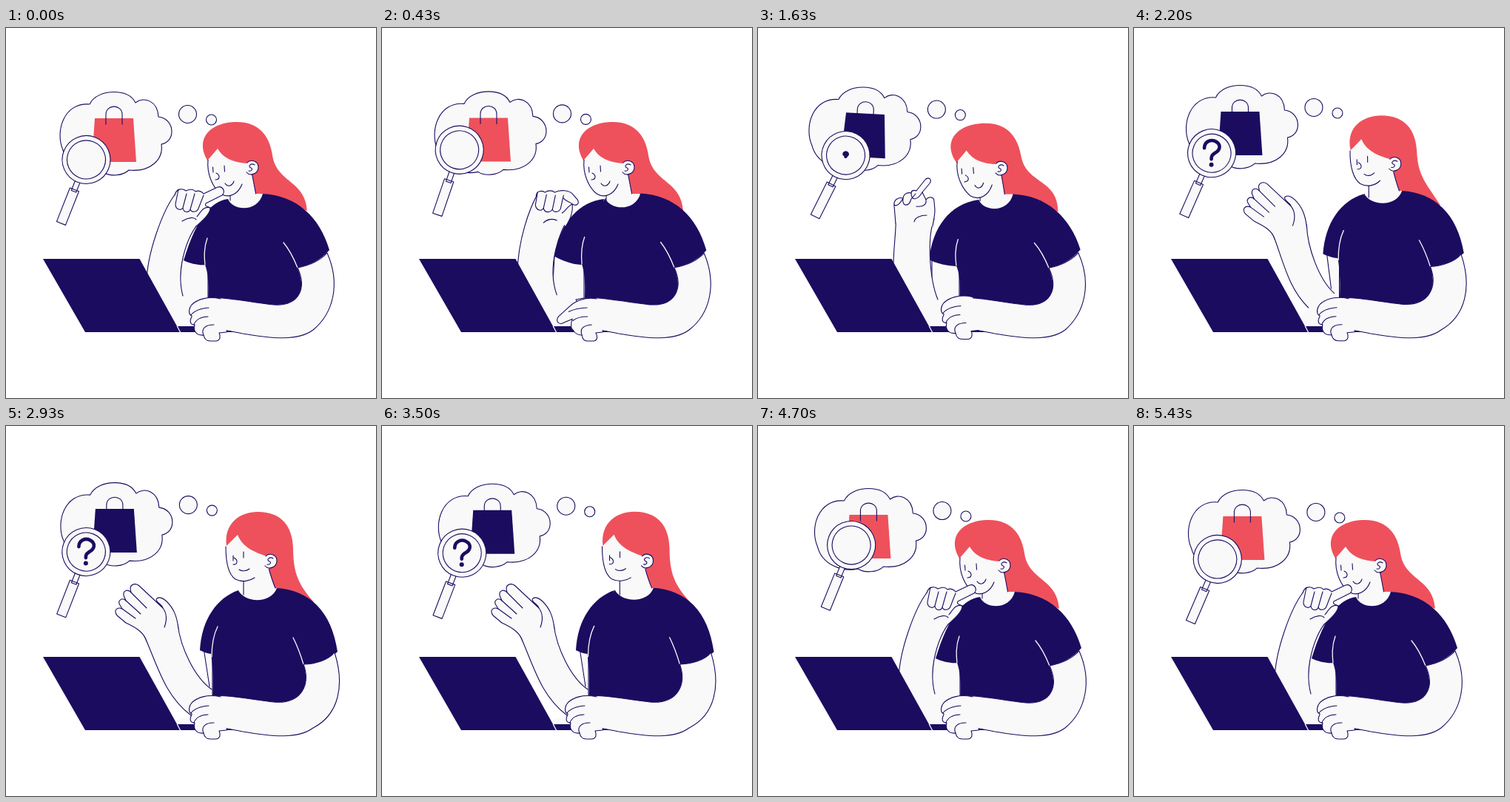
An HTML page that plays this animation: 500 by 500 pixels, repeating every 5.51 s.

```html
<!DOCTYPE html>
<html lang="en">
<head>
<meta charset="utf-8">
<title>Thinking about shopping</title>
<style>
html, body { margin: 0; width: 100%; height: 100%; overflow: hidden; background: #fff; }
svg { display: block; width: 100vw; height: 100vh; }
.skin { fill: #f9f9f9; stroke: none; }
.line, .both { stroke: #1b0c60; stroke-width: 1.1; stroke-linecap: round; stroke-linejoin: round; }
.line { fill: none; }
.both { fill: #f9f9f9; }
.navy { fill: #1b0c60; }
.red { fill: #ee515c; }
.fold { fill: none; stroke: #f9f9f9; stroke-width: 1.3; stroke-linecap: round; }
#hook { stroke-width: 4.6; vector-effect: non-scaling-stroke; }
</style>
</head>
<body>
<svg viewBox="0 0 500 500">
  <g id="cloud">
    <path class="both" d="M113,103C118,92 132,86.500 146,86.500C159,86.500 170,91 175,101C186,92 205,98 206,120C217,121 224,130 224,140C224,150 217,156 210,157C213,178 195,195 166,192C158,200 140,201 132,195C108,200 83,188 77,165C66,140 78,100 113,103Z"/>
    <circle class="both" cx="245.5" cy="116.5" r="12"/>
    <circle class="both" cx="277.5" cy="124" r="7"/>
    <g id="bag">
      <path id="bagBody" d="M120,122H172L176,181H116Z"/>
      <path class="line" d="M135,130V117C135,102.500 157,102.500 157,117V130"/>
    </g>
    <g id="lens">
      <g id="glass">
        <path class="both" d="M-3.500,30H3.500V46H-3.500Z M-6.500,43.500H6.500V92.500H-6.500Z"/>
        <circle class="both" r="32.500"/>
        <circle class="both" r="26"/>
      </g>
      <g id="question">
        <path id="hook" class="line" d="M-10,-7C-10,-16 -1,-19 5,-16C13,-12 12,-4 4,0C0,3 -.500,4 -.500,8"/>
        <circle class="navy" cx="-.500" cy="15.500" r="3"/>
      </g>
    </g>
  </g>
  <path id="upperArm" class="skin"/>
  <path id="upperArmLine" class="line"/>
  <path id="hair" class="red"/>
  <path id="neckFill" class="skin"/>
  <path id="neckLine" class="line"/>
  <path id="face" class="skin"/>
  <path id="chin" class="line"/>
  <path id="features" class="line"/>
  <path id="ear" class="both"/>
  <path id="earCurl" class="line"/>
  <path id="torso" class="navy"/>
  <path id="sleeve" class="navy"/>
  <path id="folds" class="fold"/>
  <path id="forearmFill" class="skin"/>
  <path id="forearm" class="line"/>
  <g id="hand">
    <path id="handShape" class="both"/>
    <path id="handLines" class="line"/>
  </g>
  <path class="navy" d="M232,403H304L318,411H234Z"/>
  <path class="navy" d="M50,312H180.500L235.500,411H107Z"/>
  <path class="fold" d="M231.500,403.500L235.500,411"/>
  <path id="frontArm" class="both"/>
  <g id="frontHand">
    <path id="frontShape" class="both"/>
    <path id="frontLines" class="line"/>
  </g>
</svg>
<script>
const LOOP = 5510;
const $ = id => document.getElementById(id);
const lerp = (a, b, k) => a + (b - a) * k;
const smooth = k => k * k * (3 - 2 * k);

// Blends two paths that share the same commands.
function mix(a, b, k) {
  const target = b.match(/-?[\d.]+/g);
  let i = 0;
  return a.replace(/-?[\d.]+/g, n => lerp(+n, +target[i++], k).toFixed(2));
}

// Finds the keys around t and the eased progress between them.
function span(keys, t) {
  let i = 0;
  while (i < keys.length - 2 && t >= keys[i + 1][0]) i++;
  const [t0, from] = keys[i], [t1, to] = keys[i + 1];
  const k = Math.min(1, Math.max(0, (t - t0) / (t1 - t0)));
  return { from, to, k: smooth(k) };
}
const value = (keys, t) => {
  const s = span(keys, t);
  return lerp(s.from, s.to, s.k);
};

// Each part: leaning on the desk, leaning back.
const HEAD = {
  hair: ["M273,180C254,150 276,127 312,127C345,127 357,150 360,172C366,210 404,205 407,247L347,224L335,224L320,200Z",
         "M298,162C294,130 318,116 340,116C372,116 387,135 388,165C388,200 396,215 416,238L366,219L360,219L345,190Z"],
  neckFill: ["M303,222L301,250L345,250L347,224L337.5,224C336,215 334,205 332,195",
             "M321,204L317,240L362,240L366,219L364,219C361,212 358,203 355,192"],
  neckLine: ["M303,222L303,233M337.5,224C336,215 334,205 332,195",
             "M321,204L321,228M364,219C361,212 358,203 355,192"],
  face: ["M286,163C294,177 310,182 327,183L332,198L318,212C314,224 302,231 290,224C280,216 271,198 273,178Z",
         "M313,147C320,165 338,171 352,176L356,192L345,203C333,209 320,212 310,207C301,201 297,185 297,163Z"],
  chin: ["M273,178C271,198 280,216 290,224C302,231 314,224 319,211",
         "M297,163C297,185 301,201 310,207C320,212 330,209 336,205"],
  features: ["M279.5,188L280,195M295,186L295.5,194M284,196C290,199 289,205 283,205M296,210C300,216 306,213 308,207",
             "M307,175L307,182M321,170L321,178M308,178C314,181 313,188 307,187M315,194C319,197 325,196 329,193"],
  ear: ["M326,182C330,177 341,179 341,188C341,197 330,201 325,195", "M351,176C355,171 366,173 366,182C366,191 355,195 350,189"],
  earCurl: ["M336,185C331,182 326,187 331,189C334,190 332,194 328,193", "M361,179C356,176 351,181 356,183C359,184 357,188 353,187"]
};
const BODY = {
  torso: ["M300,231C306,247 340,250 347,224C392,226 424,255 437,300C425,314 410,321 394,324C404,350 402,380 380,380C340,380 300,378 273,370C274,350 274,330 268,318L288,250Z",
          "M314,222C322,239 358,241 366,219C410,222 440,250 448,305C436,316 418,322 403,322C408,345 406,379 380,379C350,379 305,376 279,370C280,345 280,330 277,308L305,240Z"],
  folds: ["M272,284C267,298 268,310 269,320M375,290C385,302 390,314 394,324",
          "M286,271C279,285 278,300 278,312M388,286C395,300 399,312 402,322"],
  frontArm: ["M434,304C452,345 443,385 415,408C395,423 360,420 320,413C305,410 295,408 285,407L262,367C290,360 320,370 362,374C396,376 407,352 394,324C410,321 425,314 434,304",
             "M444,306C458,350 450,390 415,408C395,423 360,420 320,413C305,410 295,408 285,407L262,367C290,360 325,369 362,373C399,376 412,350 402,322C418,322 436,316 444,306"]
};

const chinRest = {
  forearm: "M190,345C190,305 212,246 229,224L270,255C246,270 229,325 239,362",
  sleeve: "M300,231C278,234 258,255 240,314C250,319 262,321 270,320L290,280Z",
  upperArm: "M238,310L234,350L256,402L273,372L273,312",
  shape: "M228,226C230,217 238,216 243,220C249,217 254,218 256,221C260,219 265,221 267,224L286,215C293,213 297,221 292,226L270,237C268,241 272,241 276,243C277,250 266,260 257,268",
  lines: "M233,218L229,238C229,246 237,247 239,243L244,224M239,243C240,250 247,250 249,245L255,224M249,245C251,250 258,249 260,244L267,226M238,261C246,256 254,255 257,259M276,243C267,240 263,249 258,255"
};
const fist = {
  forearm: "M180,322C181,280 192,245 203,222L249,250C237,275 219,320 235,360",
  sleeve: "M300,231C262,236 236,262 228,305C240,313 256,319 269,320L290,280Z",
  upperArm: "M231,304L229,350L256,402L273,372L273,312",
  shape: "M201,226C201,219 209,218 213,221C217,218 223,218 226,221C234,217 245,218 250,223L257,231C260,237 255,240 250,237C251,249 247,257 241,267",
  lines: "M203,221L200,238C201,246 209,247 211,242L215,224M211,242C212,249 220,249 223,244L227,225M223,244C225,249 232,248 234,243L238,225M250,237C246,233 242,234 238,229M250,237C243,240 241,246 236,249M211,262C216,257 224,256 229,259"
};
const idea = {
  forearm: "M183,330C182,300 188,270 186,250L238,258C228,285 232,340 243,367",
  sleeve: "M298,232C258,238 236,270 231,313C240,318 258,322 270,322L290,280Z",
  upperArm: "M235,310L235,352L256,402L272,372L272,312",
  shape: "M186,264L184,240C183,232 190,228 196,230C197,223 203,222 207,223C207,219 212,219 214,220L225,206C230,200 236,204 232,210L222,222L227,232C231,227 238,228 238,234L239,246C239,254 237,260 236,268",
  lines: "M184,239C188,242 193,236 196,230C194,242 204,242 207,231L213,224M207,223C207,235 216,232 222,222M227,232C228,239 223,242 214,241M211,262C212,256 220,253 228,253"
};
const openPalm = {
  forearm: "M250,391C215,365 205,325 188,286L232,268C236,300 255,340 278,356",
  sleeve: "M314,222C285,232 264,262 262,303C268,306 274,308 280,308L300,280Z",
  upperArm: "M267,300L275,352L258,400L279,368L279,312",
  shape: "M190,291C186,277 172,271 162,266L150,256C145,249 150,244 157,247L154,242C150,236 157,231 162,236L159,229C158,222 165,220 169,225L168,220C168,213 176,212 180,216L212,246C210,240 203,239 203,234C206,230 212,232 217,237C226,246 231,256 233,274",
  lines: "M157,247L175,260M162,236L182,254M169,225L190,246M212,246C218,254 217,264 214,272"
};
const ARM_KEYS = [[60, chinRest], [650, fist], [1150, fist], [1500, idea], [1850, idea], [2350, openPalm],
  [3500, openPalm], [3950, fist], [4200, fist], [4650, chinRest], [LOOP, chinRest]];

const FRONT_HAND = {
  frontShape: ["M290,366C272,362 258,367 251,374L249,377C246,384 248,388 251,389L251,390C247,398 250,401 255,401C253,408 256,416 267,415C268,420 270,423 276,423L284,423C290,422 290,416 288,412L298,411",
               "M290,366C275,363 262,370 255,376L236,393C231,398 235,404 241,402L259,394C256,402 257,408 259,410C262,413 267,415 271,415C272,420 273,423 278,423L287,423C292,422 292,416 289,412L298,411"],
  frontLines: ["M250,388C254,382 264,379 274,378M254,401C256,394 264,390 273,390M267,415C263,406 270,401 281,401",
               "M253,382C262,379 270,378 278,378M259,394C264,391 270,390 279,390M271,415C268,407 272,402 284,401"]
};

const HEAD_KEYS = [[0, 0], [1100, 0], [1500, -.16], [1850, -.16], [2350, 1.05], [2930, 1], [3500, 1.02], [3950, -.03], [4150, 0], [LOOP, 0]];
const BODY_KEYS = [[0, 0], [600, .15], [1100, .15], [1500, -.12], [1850, -.12], [2350, 1.05], [2930, 1], [3500, 1.05], [3950, 0], [LOOP, 0]];
const POINT_KEYS = [[150, 0], [550, 1], [1150, 1], [1450, 0], [LOOP, 0]];
const LIFT_KEYS = [[1100, 0], [1500, -2.5], [1850, -2.5], [2300, 0], [LOOP, 0]];
const QUESTION_KEYS = [[1560, 0], [1800, 1], [4030, 1], [4220, 0], [LOOP, 0]];
const NAVY_KEYS = [[1430, 0], [1590, 1], [4320, 1], [4520, 0], [LOOP, 0]];
const TILT_KEYS = [[1400, 0], [1600, 3.2], [1850, 0], [LOOP, 0]];

// Time, x, y, angle of the magnifier inside the cloud.
const LENS = [
  [0, 108.5, 178, 21.6], [350, 106, 167, 19], [900, 115, 159.4, 19.8], [1200, 127, 166, 23],
  [1630, 122.7, 178.5, 26.6], [2350, 105, 178, 23], [2930, 107.5, 180, 21.3], [3500, 105, 180, 21],
  [3780, 92, 173, 19], [4000, 101.7, 166, 18], [4350, 114, 158, 19], [4700, 122.7, 163, 22.1],
  [5050, 124, 173, 24], [5430, 112.5, 180, 23.2]
];
function lensAt(t) {
  const n = LENS.length;
  const key = i => {
    const lap = Math.floor(i / n);
    const [time, ...rest] = LENS[i - lap * n];
    return [time + lap * LOOP, ...rest];
  };
  let i = n - 1;
  while (LENS[i][0] > t) i--;
  const [a, b, c, d] = [-1, 0, 1, 2].map(o => key(i + o));
  const h = c[0] - b[0], k = (t - b[0]) / h;
  return [1, 2, 3].map(j => {
    const m0 = h * (c[j] - a[j]) / (c[0] - a[0]);
    const m1 = h * (d[j] - b[j]) / (d[0] - b[0]);
    return lerp(b[j], c[j], smooth(k)) + k * (1 - k) * (m0 * (1 - k) - m1 * k);
  });
}

const setPath = (id, d) => $(id).setAttribute("d", d);
const move = (id, transform) => $(id).setAttribute("transform", transform);
function blendParts(parts, k) {
  for (const id in parts) setPath(id, mix(...parts[id], k));
}

// Middle of the wrist, where the two forearm edges meet the hand.
function wrist(forearm) {
  const n = forearm.match(/-?[\d.]+/g).map(Number);
  return [(n[6] + n[8]) / 2, (n[7] + n[9]) / 2];
}

function drawCloud(t) {
  const phase = 2 * Math.PI * t / LOOP;
  move("cloud", `translate(${-4.3 * Math.sin(phase)} ${-5 * (1 - Math.cos(phase))})`);
  move("bag", `rotate(${value(TILT_KEYS, t)} 146 181)`);
  const k = value(NAVY_KEYS, t);
  const rgb = [[238, 27], [81, 12], [92, 96]].map(([a, b]) => Math.round(lerp(a, b, k)));
  $("bagBody").setAttribute("fill", `rgb(${rgb})`);
  const [x, y, angle] = lensAt(t);
  move("lens", `translate(${x} ${y})`);
  move("glass", `rotate(${angle})`);
  const size = value(QUESTION_KEYS, t);
  move("question", `scale(${size})`);
  $("question").style.display = size > 0 ? "" : "none";
}

function drawRaisedArm(t) {
  const { from, to, k } = span(ARM_KEYS, t);
  const part = name => mix(from[name], to[name], k);
  const forearm = part("forearm"), upper = part("upperArm");
  setPath("forearm", forearm);
  setPath("forearmFill", forearm + "L256,402L215,402Z");
  setPath("sleeve", part("sleeve"));
  setPath("upperArm", upper);
  const p = upper.slice(1).split("L");
  setPath("upperArmLine", `M${p[0]}L${p[1]}M${p[3]}L${p[4]}`);

  const pose = k < .5 ? from : to;
  const now = wrist(forearm), home = wrist(pose.forearm);
  setPath("handShape", pose.shape);
  setPath("handLines", pose.lines);
  move("hand", `translate(${now[0] - home[0]} ${now[1] - home[1]})`);
}

function draw(t) {
  drawCloud(t);
  blendParts(HEAD, value(HEAD_KEYS, t));
  blendParts(BODY, value(BODY_KEYS, t));
  drawRaisedArm(t);
  blendParts(FRONT_HAND, value(POINT_KEYS, t));
  move("frontHand", `translate(0 ${value(LIFT_KEYS, t)})`);
}

const start = performance.now();
function tick() {
  draw((performance.now() - start) % LOOP);
  requestAnimationFrame(tick);
}
tick();
</script>
</body>
</html>
```
